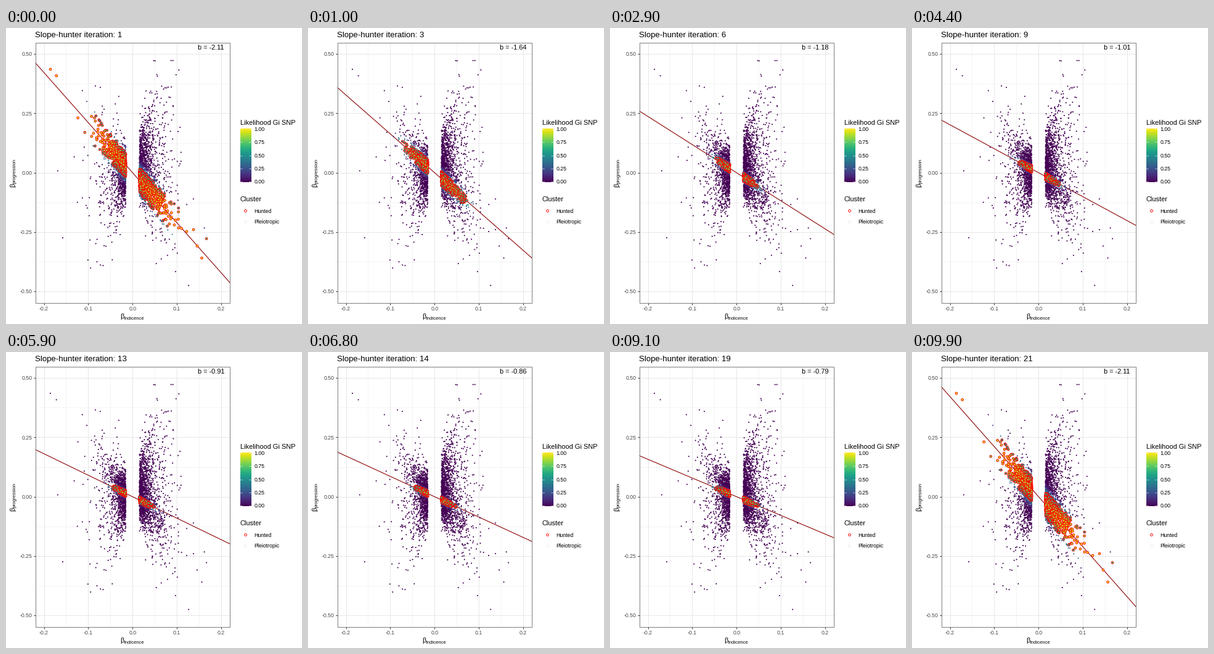
A matplotlib script that plays this animation: 480x480 px, repeating every 10 s.

```python
import numpy as np
import matplotlib.pyplot as plt
from matplotlib.animation import FuncAnimation

plt.rcParams["font.family"] = "Liberation Sans"
PX = 0.72                                # points per pixel at 100 dpi
LEFT, RIGHT, TOP, BOTTOM = 47.5, 363.3, 23.5, 446
X0, Y0, SX, SY = 205.3, 234.7, 718.75, 384.9
STEPS = 21
# Each iteration lasts five frames, with a few four-frame ones between
STARTS = np.cumsum([0, 4] + [5] * 9 + [4] + [5] * 6 + [4] * 4)

rng = np.random.default_rng(7)


def slope(i):
    return -(0.72 + 1.39 * np.exp(-0.2264 * i**0.88))


def cloud(side, n, reach, tilt, centre, spread, growth, start=0.0155, limit=0.105):
    """Scatter beyond |x| = start, widening with distance from it."""
    u = rng.exponential(reach, n)
    x = side * (start + u)
    y = centre - tilt * x * SY + rng.normal(size=n) * (spread + growth * u)
    keep = (abs(x) < limit) & (abs(y - Y0) < 192)
    return np.column_stack([X0 + x * SX, y])[keep]


points = np.vstack([
    [(72, 67), (293, 330), (304, 327), (310, 353.5), (317.5, 373)],
    cloud(-1, 440, 0.014, -1.6, Y0, 12, 60, limit=0.07),
    cloud(1, 540, 0.018, -1.6, Y0, 12, 90),
    cloud(-1, 26, 0.025, -2.0, Y0, 14, 100, start=0.06, limit=0.125),
    cloud(1, 30, 0.012, -2.1, Y0, 13, 100, start=0.06),
    cloud(-1, 880, 0.015, 0, 241, 21, 700),
    cloud(1, 1250, 0.019, 0, 219, 23, 1000),
    cloud(-1, 70, 0.045, 0, 230, 70, 500, start=0.03, limit=0.185),
    cloud(1, 70, 0.045, 0, 225, 85, 300, start=0.035, limit=0.195)])
xs = (points[:, 0] - X0) / SX
size_x = abs(xs)


def likelihood(i):
    """Membership probability for iteration i; the band narrows over time."""
    width = 4.8 + 13.2 * np.exp(-0.33 * i)
    reach = 0.05 + 0.25 * np.exp(-1.15 * i)
    gap = (points[:, 1] - (Y0 - slope(i) * xs * SY)) / width
    z = 1.5 * (1 - gap**2 - (size_x / reach)**4)
    z += 20 * np.exp(-0.9 * i) * size_x
    return 1 / (1 + np.exp(-np.clip(z, -50, 50)))


chances = [likelihood(i) for i in range(STEPS)]

fig = plt.figure(figsize=(4.8, 4.8), dpi=100, facecolor="white")
ax = fig.add_axes([0, 0, 1, 1])
ax.axis("off")


def text(x, y, s, size, color="black", ha="left", va="baseline", **kw):
    return ax.text(x, y, s, fontsize=size * PX, color=color, ha=ha, va=va, **kw)


def segment(x, y, color, width, z):
    return ax.plot(x, y, color=color, lw=width * PX, zorder=z,
                   solid_capstyle="butt")[0]


# Panel grid, ticks and tick labels
for k in range(-2, 3):
    gx, gy = X0 + k * 0.1 * SX, Y0 - k * 0.25 * SY
    segment([gx, gx], [TOP, BOTTOM], "#e8e8e8", 1.07, 1)
    segment([LEFT, RIGHT], [gy, gy], "#e8e8e8", 1.07, 1)
    if k < 2:
        mx, my = gx + 0.05 * SX, gy - 0.125 * SY
        segment([mx, mx], [TOP, BOTTOM], "#ebebeb", 0.53, 1)
        segment([LEFT, RIGHT], [my, my], "#ebebeb", 0.53, 1)
    segment([gx, gx], [BOTTOM, BOTTOM + 2.8], "#333333", 1.07, 6)
    segment([LEFT - 2.8, LEFT], [gy, gy], "#333333", 1.07, 6)
    text(gx, 458, f"{k * 0.1:.1f}", 8.8, "#4d4d4d", "center")
    text(42.8, gy + 3.2, f"{k * 0.25:.2f}", 8.8, "#4d4d4d", "right")
ax.add_patch(plt.Rectangle((LEFT, TOP), RIGHT - LEFT, BOTTOM - TOP, fill=False,
                           ec="#7f7f7f", lw=PX, zorder=6))

# Axis titles with subscripts
text(185.5, 471, "β", 11)
text(192, 473, "indicence", 7.7)
upright = dict(rotation=90, rotation_mode="anchor")
text(14, 258, "β", 11, **upright)
text(16, 251.5, "progression", 7.7, **upright)

# Legends
text(379.7, 157, "Likelihood Gi SNP", 11)
ax.imshow(np.linspace(1, 0, 86)[:, None], cmap="viridis", aspect="auto",
          extent=(379.7, 397, 249.7, 163.5), zorder=3)
for k in range(5):
    y = 249.3 - k * 21.35
    for x in (379.7, 393.5):
        segment([x, x + 3.5], [y, y], "white", 0.6, 4)
    text(402.5, y + 3.2, f"{k / 4:.2f}", 8.8)
text(379.7, 281, "Cluster", 11)
for y, name, color in ((296.3, "Hunted", "red"), (313.6, "Pleiotropic", "#ededed")):
    ax.scatter([388.4], [y], s=(3.8 * PX)**2, facecolor="white",
               edgecolor=color, lw=0.9 * PX)
    text(402.5, y + 3.5, name, 8.8)
ax.set_xlim(0, 480)
ax.set_ylim(480, 0)

# Moving parts
line = segment([LEFT, RIGHT], [Y0, Y0], "#8b0000", 1.1, 2)
dots = ax.scatter([], [], s=(2.05 * PX)**2, lw=0, zorder=3)
rings = ax.scatter([], [], s=(3.7 * PX)**2, lw=0.9 * PX, zorder=4)
title = text(47, 15, "", 13.2)
label = text(332.3, 35, "", 11, ha="center", zorder=7)


def state(frame):
    return (np.searchsorted(STARTS, frame, side="right") - 1) % STEPS


def draw(frame):
    i = state(frame)
    b, p = slope(i), chances[i]
    hunted = p > 0.5
    for marks, chosen in ((dots, ~hunted), (rings, hunted)):
        marks.set_offsets(points[chosen])
        marks.set_facecolor(plt.cm.viridis(p[chosen]))
    rings.set_edgecolor("red")
    line.set_ydata([Y0 - b * (x - X0) / SX * SY for x in (LEFT, RIGHT)])
    label.set_text(f"b = {b:.2f}")
    # The heading follows the data one frame late
    title.set_text(f"Slope-hunter iteration: {state(max(frame - 1, 0)) + 1}")
    return line, dots, rings, title, label


anim = FuncAnimation(fig, draw, frames=100, interval=100, repeat=True,
                     repeat_delay=0)
plt.show()
```
